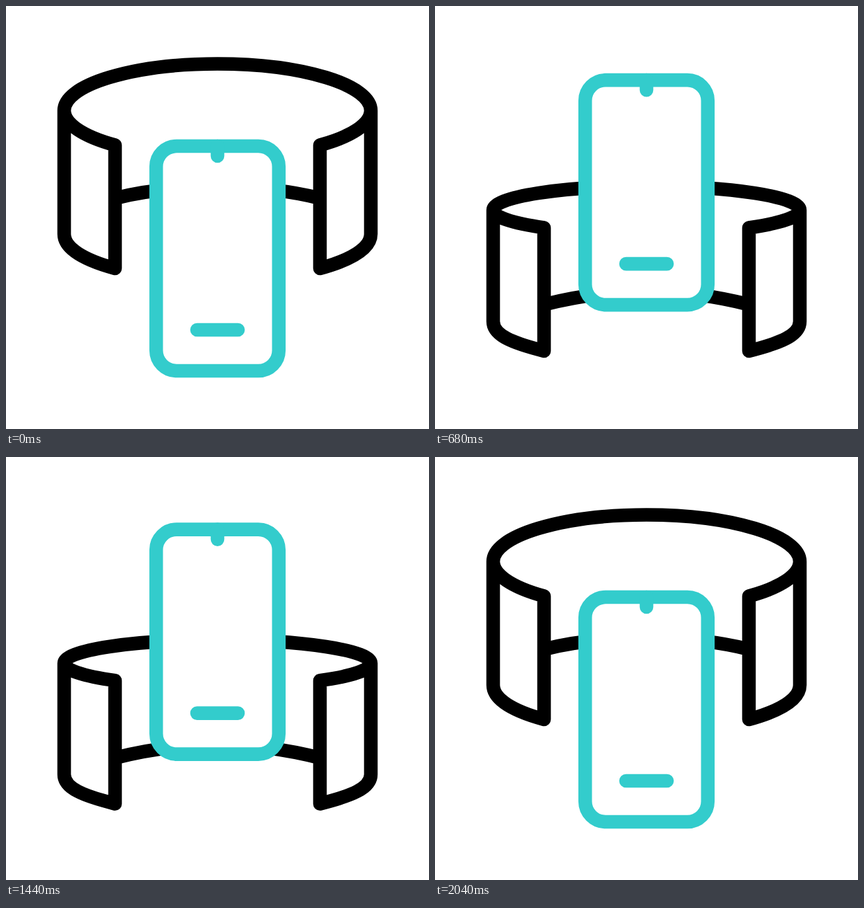
Write an HTML page that moves like this. It is 640 px wide and 640 px high and loops after 2.12 s.

```html
<!DOCTYPE html>
<html lang="en">
<head>
<meta charset="utf-8">
<title>Phone in headset</title>
<style>
  html, body { margin: 0; width: 100%; height: 100%; overflow: hidden; background: #fff; }
  svg { display: block; width: 100vw; height: 100vh; }
  .line { fill: none; stroke-width: 20.6; stroke-linecap: round; stroke-linejoin: round; }
</style>
</head>
<body>
<svg viewBox="0 0 640 640">
  <defs>
    <clipPath id="screen"><rect x="222" y="207" width="196" height="350" rx="36"/></clipPath>
  </defs>
  <path id="band" class="line" stroke="#000"/>
  <g id="phone" class="line" stroke="#33cccc">
    <rect x="227.2" y="212" width="185.6" height="340" rx="31" fill="#fff"/>
    <g clip-path="url(#screen)"><path id="shine" d="M120 582L520 182"/></g>
    <path d="M320 212V227M289 490H351"/>
  </g>
</svg>
<script>
const LOOP = 2120, STEP = 40;
const band = document.getElementById('band');
const phone = document.getElementById('phone');
const shine = document.getElementById('shine');

const mix = (a, b, k) => a + (b - a) * k;
const unit = (n, a, b) => Math.min(1, Math.max(0, (n - a) / (b - a)));
const smooth = u => u * u * (3 - 2 * u);
const smoother = u => u * u * u * (10 + u * (6 * u - 15));

// Rises over a..b, falls back over c..d
const upDown = (n, a, b, c, d) => smoother(unit(n, a, b)) - smoother(unit(n, c, d));

// Eased value along [step, value] keys
function track(n, keys) {
  let value = keys[0][1];
  for (let i = 1; i < keys.length; i++) {
    value += (keys[i][1] - keys[i - 1][1]) * smooth(unit(n, keys[i - 1][0], keys[i][0]));
  }
  return value;
}

const TILT = [[20, 0], [23.4, 9.3], [29.7, -9.3], [33, 0]];

// p = 0: band high and open, p = 1: band low and flat
function bandPath(p) {
  const ry = mix(70.5, 33, p);
  const rim = mix(158, 322, p);
  const tip = rim + 0.744 * ry;
  const base = mix(345, 489, p);
  const foot = mix(397, 533, p);
  const bend = mix(384, 521, p);
  const end = mix(291, 466, p);
  const peak = mix(274, 446, p);
  const panel = (x, dir, sweep) =>
    `M${x} ${rim}A232 ${ry} 0 0 ${sweep} ${x + 77 * dir} ${tip}V${foot}` +
    `C${x + 29 * dir} ${bend} ${x} ${base + 21} ${x} ${base}Z`;
  return `M88 ${rim}A232 ${ry} 0 0 1 552 ${rim}` +
    panel(88, 1, 0) + panel(552, -1, 1) +
    `M165 ${end}C212 ${end - 12} 265 ${peak} 320 ${peak}` +
    `S428 ${end - 12} 475 ${end}`;
}

function draw(time) {
  const n = Math.floor((time % LOOP) / STEP);
  band.setAttribute('d', bandPath(upDown(n, 1.73, 21.5, 32.3, 50.4)));

  const lift = 111.3 * upDown(n, 0.45, 22.5, 31.5, 51.4);
  phone.setAttribute('transform', `translate(0 ${-lift}) rotate(${track(n, TILT)} 320 320)`);

  const u = unit(n, 20, 32.8);
  const shift = mix(-125, 125, smooth(u));
  shine.setAttribute('transform', `translate(${shift} ${shift})`);
  shine.setAttribute('visibility', u > 0 && u < 1 ? 'visible' : 'hidden');
}

const start = performance.now();
function tick() {
  draw(performance.now() - start);
  requestAnimationFrame(tick);
}
tick();
</script>
</body>
</html>
```
